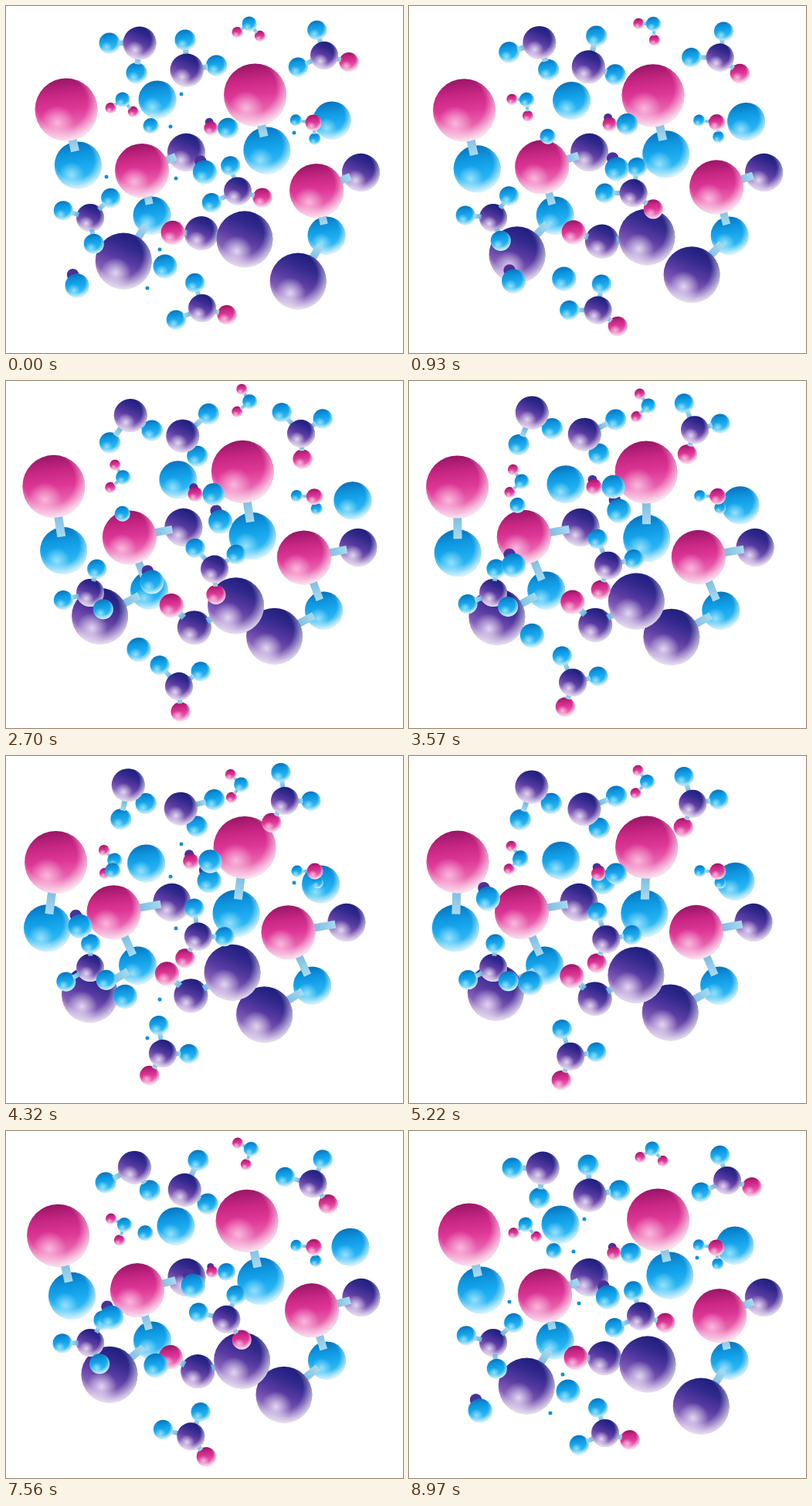
These frames come from a looping animation (514 px wide and 449 px high, 9 s). An HTML page with a canvas:

```html
<!DOCTYPE html>
<html lang="en">
<head>
<meta charset="utf-8">
<title>Molecules</title>
<style>
html, body { margin: 0; width: 100%; height: 100%; overflow: hidden; background: #fff; }
canvas { display: block; }
</style>
</head>
<body>
<canvas id="stage" width="514" height="449"></canvas>
<script>
const ctx = document.getElementById('stage').getContext('2d');
const LOOP = 9000;
const { PI, sin, cos } = Math;
const rad = deg => deg * PI / 180;

// Gradients for a sphere of radius 1, scaled when drawn
function linear(colors, lean) {
  const g = ctx.createLinearGradient(lean, -0.95, -lean, 0.95);
  colors.forEach((c, i) => g.addColorStop(i / (colors.length - 1), c));
  return g;
}
function radial(x, y, r0, r1, rgb, a0, a1) {
  const g = ctx.createRadialGradient(x, y, r0, x, y, r1);
  g.addColorStop(0, `rgba(${rgb},${a0})`);
  g.addColorStop(1, `rgba(${rgb},${a1})`);
  return g;
}
const skin = (colors, lean, shine) => [
  linear(colors, lean),
  radial(-0.28, 0.42, 0, 0.55, shine, 0.8, 0),
  radial(-0.15, -0.22, 0.82, 1.24, '255,255,255', 0, 0.7)
];
const SKINS = {
  pink: skin(['#9c1769', '#c92784', '#de3897', '#e862ae', '#f3a0cd'], -0.1, '255,205,233'),
  blue: skin(['#0a74be', '#0d95de', '#18a8ee', '#2cb6f3', '#7fd6fb'], -0.15, '175,236,255'),
  purple: skin(['#1d1d7a', '#33298d', '#5a3ba2', '#8460b8', '#c3acdb'], 0.4, '250,242,255')
};

function ball(color, x, y, r) {
  ctx.save();
  ctx.translate(x, y);
  ctx.scale(r, r);
  ctx.beginPath();
  ctx.arc(0, 0, 1, 0, 2 * PI);
  for (const fill of SKINS[color]) {
    ctx.fillStyle = fill;
    ctx.fill();
  }
  ctx.restore();
}

function disc(color, x, y, r) {
  ctx.fillStyle = color;
  ctx.beginPath();
  ctx.arc(x, y, r, 0, 2 * PI);
  ctx.fill();
}

function bond(a, b, width) {
  const dx = b.x - a.x, dy = b.y - a.y, d = Math.hypot(dx, dy);
  const inset = width > 8 ? 0.6 : 0.85;
  const s = a.r * inset / d, e = 1 - b.r * inset / d;
  if (s >= e) return;
  const ends = [a.x + dx * s, a.y + dy * s, a.x + dx * e, a.y + dy * e];
  const tint = ctx.createLinearGradient(...ends);
  tint.addColorStop(0, '#68b0dc');
  tint.addColorStop(1, '#a8daf0');
  ctx.strokeStyle = tint;
  ctx.lineWidth = width;
  ctx.beginPath();
  ctx.moveTo(ends[0], ends[1]);
  ctx.lineTo(ends[2], ends[3]);
  ctx.stroke();
}

// Out and back: s runs 0 to 1 to 0, bend peaks midway
function swing(t) {
  const u = Math.min(t, LOOP - t) / (LOOP / 2);
  const s = u + 0.4 * u * u * (1 - u);
  return { s, bend: sin(PI * s ** 1.25), ease: sin(PI * s / 2) };
}

const scene = [];

const atom = (color, r, angle = 0, dist = 0, opts = {}) =>
  ({ color, r, angle, dist, sway: 0, grow: 0, ...opts });

// Atoms turn around the first one, which drifts; front atoms cover the bonds
function molecule({ at, drift = [0, 0], arc = [0, 0], turn = 0, width, bonds, copies = [[0, 0]] }, ...atoms) {
  const links = bonds || atoms.slice(1).map((_, i) => [0, i + 1]);
  for (const shift of copies) {
    scene.push(t => {
      const { s, bend, ease } = swing(t);
      const [cx, cy] = at.map((v, k) => v + shift[k] + drift[k] * s + arc[k] * bend);
      const now = atoms.map(a => {
        const angle = rad(a.angle + (a.turn ?? turn) * s + a.sway * bend);
        const dist = a.dist + a.grow * ease;
        return { ...a, x: cx + dist * cos(angle), y: cy + dist * sin(angle) };
      });
      const paint = a => ball(a.color, a.x, a.y, a.r);
      now.filter(a => !a.front).forEach(paint);
      links.forEach(([a, b]) => bond(now[a], now[b], width));
      now.filter(a => a.front).forEach(paint);
    });
  }
}

const front = true;

// Specks blink four times per loop
const SPECKS = [[227, 114], [213, 156], [130, 221], [220, 223], [199, 315], [183, 365], [373, 164]];
scene.push(t => {
  if (cos(8 * PI * t / LOOP) > 0.67) SPECKS.forEach(([x, y]) => disc('#1292d6', x, y, 2.5));
});

molecule({ at: [196, 121], drift: [-19, 19], arc: [41, -6], copies: [[0, 0], [226, 27]] },
  atom('blue', 24.5));

molecule({
  at: [189, 271], drift: [-20, 0], arc: [10, 0], width: 10,
  bonds: [[2, 0], [2, 1], [3, 0]], copies: [[0, 0], [226, 26]]
},
  atom('blue', 24.5),
  atom('purple', 24.5, -61.5, 93),
  atom('pink', 35, -102.6, 59.5, { turn: -12, grow: 16, front }),
  atom('purple', 36.5, 122, 69.5, { turn: 26, sway: 14, grow: 3, front }));

molecule({ at: [253, 294], drift: [-14, 15], arc: [0, 16], width: 8 },
  atom('purple', 22),
  atom('pink', 15.5, 181, 37, { turn: 41, sway: 17, grow: 5, front }),
  atom('purple', 36.5, 8, 56.5, { turn: -37, sway: -12, grow: 5, front }));

molecule({
  at: [78, 134], drift: [-13, 3.5], arc: [-8, 0], turn: 21, width: 11,
  copies: [[0, 0], [244.5, -19]]
},
  atom('pink', 40.5, 0, 0, { front }),
  atom('blue', 30.5, 78, 73.5, { sway: -11, grow: 12.5 }));

molecule({ at: [173, 48], drift: [-15, -11], arc: [-2, 4], width: 7 },
  atom('purple', 21.5, 0, 0, { front }),
  atom('blue', 13.5, 180, 39, { turn: -80, grow: 6 }),
  atom('blue', 13.5, 96, 39, { turn: -48, sway: -31, grow: -6 }));

molecule({ at: [234, 83], drift: [-8, -15], arc: [0, -2], width: 7 },
  atom('purple', 21.5, 0, 0, { front }),
  atom('blue', 13.5, -93, 39, { turn: 80, grow: 6 }),
  atom('blue', 13.5, -9, 39, { turn: 55, sway: 28, grow: -8 }));

molecule({
  at: [315, 23], drift: [-11.5, 15], arc: [8.5, -6.5], turn: 76, width: 4,
  copies: [[0, 0], [-164, 98]]
},
  atom('blue', 9.5, 0, 0, { front }),
  atom('pink', 7, 145, 19, { sway: 44 }),
  atom('pink', 7, 49, 21, { sway: 44 }));

molecule({
  at: [412, 64], drift: [-53, -7], arc: [5, 9], turn: 109, width: 6,
  copies: [[0, 0], [-112, 175.5], [-158, 327]]
},
  atom('purple', 18, 0, 0, { front }),
  atom('blue', 12.5, -106, 34),
  atom('blue', 12.5, 156, 37),
  atom('pink', 12.5, 15, 33));

molecule({ at: [398, 151], drift: [2, -2], turn: -8, width: 4 },
  atom('pink', 10.5, 0, 0, { front }),
  atom('blue', 7.5, 188, 23),
  atom('blue', 7.5, 85, 21, { grow: -6 }));

molecule({ at: [109, 274], turn: -46, width: 6 },
  atom('purple', 18),
  atom('blue', 12.5, 195, 36),
  atom('blue', 12.5, 316, 37, { grow: -6 }),
  atom('blue', 13, 82, 34, { grow: -8, front }));

// Free balls: each follows a closed curve over the loop
const orbit = (path, paint) => scene.push(t => paint(...path(2 * PI * t / LOOP)));
const plain = r => (x, y) => ball('blue', x, y, r);
const shaded = r => (x, y) => {
  disc('#4a3198', x - 0.35 * r, y - 0.9 * r, 0.5 * r);
  ball('blue', x, y, r);
};
const pair = (x, y) => {
  const r = 13.3 - (y - 158) / 12;
  const px = x - 1.66 * r;
  disc('#4a3198', px - 2, y - 0.6 * r, 0.4 * r);
  ball('pink', px, y, 0.67 * r);
  ball('blue', x, y, r);
};

orbit(a => [163 + 25 * cos(a + 0.2), 150 + 25 * sin(a + 0.2)], plain(10));
orbit(a => [180 + 26 * cos(a), 322 + 35 * sin(a + 0.44)], plain(15.5));
orbit(a => [259 + 19 * sin(a - 0.09), 188 + 27 * cos(a - 0.09)], shaded(15.5));
orbit(a => [135 + 20 * sin(a) - 43 * cos(2 * a), 258 + 90 * cos(a - 0.61) + 30 * cos(2 * a)], shaded(15.5));
orbit(a => [276 + 12 * cos(a + 0.35), 158 + 20 * cos(a + 1.05) - 10 * cos(2 * a)], pair);

// Poses are held: twelve per 1770 ms
function held(t) {
  if (t < 180 || t >= 8970) return 0;
  const s = t - 30, rest = s % 1770;
  return 30 + s - rest + Math.floor(rest / 150) * 150;
}

let shown = -1;
function frame() {
  const t = held(performance.now() % LOOP);
  if (t !== shown) {
    shown = t;
    ctx.fillStyle = '#fff';
    ctx.fillRect(0, 0, 514, 449);
    scene.forEach(draw => draw(t));
  }
  requestAnimationFrame(frame);
}
frame();
</script>
</body>
</html>
```
